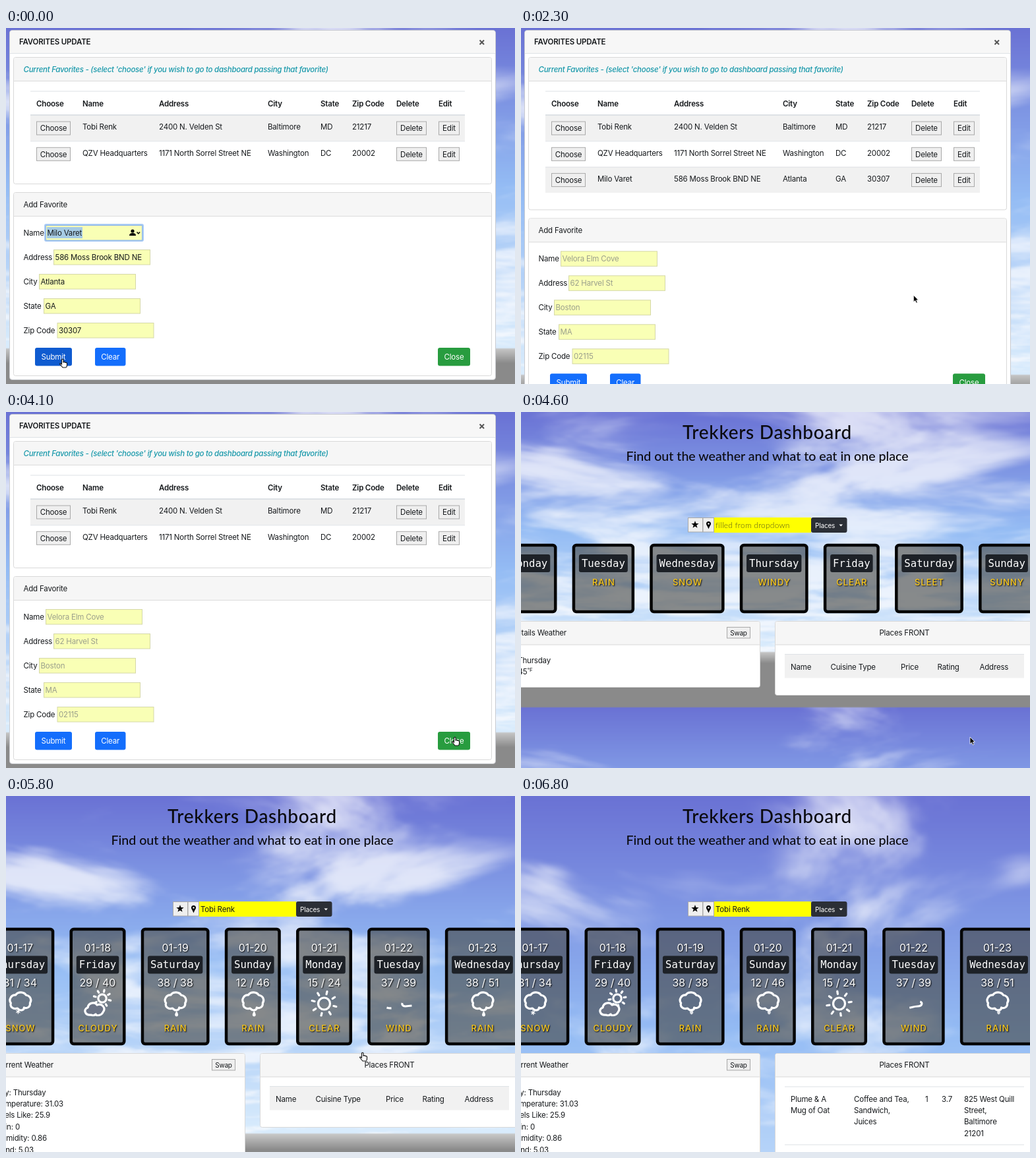
An HTML page with a canvas for the animation above (6.9 s loop, 772 by 540 pixels).

```html
<!DOCTYPE html>
<html lang="en">
<head>
<meta charset="utf-8">
<title>Trekkers Dashboard</title>
<style>
html, body { margin: 0; width: 772px; height: 540px; overflow: hidden; background: #8a8a8a; }
canvas, svg { position: absolute; left: 0; top: 0; width: 772px; height: 540px; }
text { font: 11.5px Inter, sans-serif; letter-spacing: -.18px; fill: #16191c; white-space: pre; }
.b { font-weight: 600; }
.i { font-style: italic; font-weight: 500; fill: #1798aa; letter-spacing: -.26px; }
.hint { fill: #9b9f8c; }
.btn { fill: #fff; }
.h1 { font: 500 28px Lato, sans-serif; letter-spacing: .7px; fill: #0b0b10; }
.h2 { font: 500 19.6px Lato, sans-serif; letter-spacing: 0; fill: #0b0b10; }
.thin { font: 300 12px Lato, sans-serif; letter-spacing: .2px; fill: #55551a; }
.small { font-size: 10px; }
.day { font: 15.65px "DejaVu Sans Mono", monospace; letter-spacing: 0; fill: #fff; }
.num { font-size: 16px; letter-spacing: 0; fill: #fff; text-shadow: 1px 1px 2px #000; }
.cond { font-size: 13px; font-weight: 500; letter-spacing: 1px; fill: #fbc91c; text-shadow: 1px 1px 2px #000; }
.ico { fill: none; stroke: #fff; stroke-width: 3.2; stroke-linecap: round; stroke-linejoin: round; }
</style>
</head>
<body>
<canvas id="sky" width="386" height="270"></canvas>
<svg id="ui" viewBox="0 0 772 540"></svg>
<script>
const LOOP = 6900, ADDED = 1000, DELETED = 3400, CLOSED = 4400, FILLED = 4800, LOADED = 5900;
const ui = document.getElementById('ui');
const ctx = document.getElementById('sky').getContext('2d');

/* ---------- sky ---------- */
const clamp = v => Math.max(0, Math.min(1, v));
const smooth = v => v * v * (3 - 2 * v);
const mix = (a, b, k) => a + (b - a) * k;
const blend = (p, q, k) => p.map((v, i) => mix(v, q[i], k));

function hash(x, y) {
  let h = Math.imul(x, 374761393) + Math.imul(y, 668265263) | 0;
  h = Math.imul(h ^ h >>> 13, 1274126177);
  return ((h ^ h >>> 16) >>> 0) / 4294967296;
}
function noise(x, y) {
  const i = Math.floor(x), j = Math.floor(y), u = smooth(x - i), v = smooth(y - j);
  return mix(mix(hash(i, j), hash(i + 1, j), u), mix(hash(i, j + 1), hash(i + 1, j + 1), u), v);
}
function fbm(x, y) {
  let sum = 0, amp = .5;
  for (let o = 0; o < 5; o++, amp /= 2, x = x * 2 + 7, y = y * 2 + 3) sum += amp * noise(x, y);
  return sum;
}

const ZENITH = [106, 114, 212], MIDDLE = [148, 188, 244], HORIZON = [216, 235, 252], WHITE = [250, 251, 254];

// h: height of the backdrop; blobs: x, y, rx, ry, added cover
const modalBlobs = [[757, 115, 60, 40, .15], [757, 380, 60, 70, .2], [757, 20, 60, 30, -.12]];
const skies = {
  two: { h: 597, base: 0, blobs: modalBlobs },
  three: { h: 646, base: 0, blobs: modalBlobs },
  empty: { h: 447, base: .04, blobs: [[90, 20, 150, 40, .14], [680, 40, 130, 50, .18], [80, 130, 150, 30, .16],
    [620, 120, 200, 30, .16], [380, 50, 130, 45, -.1], [390, 260, 450, 80, .17], [290, 480, 70, 25, .12]] },
  filled: { h: 630, base: -.04, blobs: [[110, 125, 150, 32, .22], [620, 110, 180, 45, .18],
    [280, 30, 140, 40, .08], [120, 20, 140, 30, .05], [380, 310, 450, 90, .16]] },
  loaded: { h: 900, base: -.12, blobs: [[250, 140, 130, 45, .28], [20, 110, 60, 40, .2], [565, 45, 60, 50, .18],
    [440, 50, 70, 50, .14], [765, 110, 45, 40, .22], [340, 35, 80, 30, .1], [380, 390, 450, 60, .15]] }
};

function skyColor(x, y, { h, base, blobs }) {
  const v = y % h / h;
  if (v > .812) {
    const g = mix(200, 138, clamp((v - .812) * 26));
    return [g, g, g];
  }
  const z = 1 / (1.05 - v), px = (x - 386) / 220 * z + 40, py = 6 * z;
  let cover = fbm(px + 1.2 * noise(px * .8, py * .8 + 9), py) + base - (y > h ? .2 : 0);
  for (const [bx, by, rx, ry, a] of blobs)
    cover += a * Math.exp(-(((x - bx) / rx) ** 2) - ((y - by) / ry) ** 2);
  const k = v / .8 * 2;
  const air = k < 1 ? blend(ZENITH, MIDDLE, k) : blend(MIDDLE, HORIZON, clamp(k - 1));
  return blend(air, WHITE, smooth(clamp((cover - .38) / .42)) * .78);
}

const skyCache = {};
function paintSky(name) {
  if (!skyCache[name]) {
    const img = ctx.createImageData(386, 270);
    for (let n = 0; n < 386 * 270; n++)
      img.data.set([...skyColor(n % 386 * 2, Math.floor(n / 386) * 2, skies[name]), 255], n * 4);
    skyCache[name] = img;
  }
  ctx.putImageData(skyCache[name], 0, 0);
}

/* ---------- drawing helpers ---------- */
const text = (x, y, s, cls = '', anchor = 'start') =>
  `<text x="${x}" y="${y}" class="${cls}" text-anchor="${anchor}">${s}</text>`;
const mid = (x, y, s, cls) => text(x, y, s, cls, 'middle');
const rect = (x, y, w, h, fill, stroke = 'none', r = 0, sw = 1) =>
  `<rect x="${x}" y="${y}" width="${w}" height="${h}" fill="${fill}" stroke="${stroke}" rx="${r}" stroke-width="${sw}"/>`;
const path = (d, attrs = '') => `<path d="${d}" ${attrs}/>`;
const rule = (x, y, w, color = '#dee2e6', h = 1) => rect(x, y, w, h, color);
const group = (x, y, s) => `<g transform="translate(${x} ${y})">${s}</g>`;
const plainBtn = (x, y, w, h, s, cls = '') =>
  rect(x + .5, y + .5, w - 1, h - 1, '#efefef', '#a9a9a9') + mid(x + w / 2, y + h / 2 + 4.2, s, cls);
const solidBtn = (x, y, w, s, color) => rect(x, y, w, 27.5, color, 'none', 3) + mid(x + w / 2, y + 18, s, 'btn');
const card = (x, y, w, h, head) =>
  rect(x + .5, y + .5, w, h, '#fff', '#d9d9d9', 3) + rect(x + 1, y + 1, w - 1, head, '#f6f6f6', 'none', 3) +
  rule(x + 1, y + head, w - 1, '#dcdcdc');

/* ---------- modal ---------- */
const columns = [46, 116, 232, 397, 477, 525, 592, 656];
const heads = ['Choose', 'Name', 'Address', 'City', 'State', 'Zip Code', 'Delete', 'Edit'];
const saved = [
  ['Tobi Renk', '2400 N. Velden St', 'Baltimore', 'MD', '21217'],
  ['QZV Headquarters', '1171 North Sorrel Street NE', 'Washington', 'DC', '20002'],
  ['Milo Varet', '586 Moss Brook BND NE', 'Atlanta', 'GA', '30307']
];
const hints = ['Velora Elm Cove', '62 Harvel St', 'Boston', 'MA', '02115'];
const labels = ['Name', 'Address', 'City', 'State', 'Zip Code'];
const fieldX = [60, 72, 50, 57, 77.5];

function tableRow(cells, i, mouse) {
  const y = 132 + i * 39.3;
  const hover = mouse.x > 37 && mouse.x < 696 && mouse.y >= y && mouse.y < y + 39.3;
  return rect(37, y, 659, 39.3, hover ? '#e5e5e5' : i % 2 ? '#fff' : '#f1f1f1') + rule(37, y, 659) +
    cells.map((s, c) => text(columns[c + 1], y + 22.3, s)).join('') +
    plainBtn(46, y + 9.5, 52, 21, 'Choose') + plainBtn(592, y + 9.5, 46, 21, 'Delete') +
    plainBtn(656, y + 9.5, 32, 21, 'Edit');
}

function form(typed) {
  let s = '';
  labels.forEach((label, i) => {
    const y = 299 + i * 37, x = fieldX[i], focus = typed && !i;
    s += text(26.5, y + 16, label);
    if (focus) s += rect(x - 1, y - 1, 149, 25, 'none', '#a9cbf5', 2, 2);
    s += rect(x + .5, y + .5, 146, 22.5, '#f9ffb5', focus ? '#8fb6e6' : '#d5d8a8');
    if (focus) s += rect(62, y + 3, 54, 17, '#a6cbe4');
    s += text(x + 2.5, y + 16, typed ? saved[2][i] : hints[i], typed ? '' : 'hint');
  });
  if (typed) s += '<circle cx="192" cy="308" r="2.6"/>' + path('M187 315q0-4 5-4t5 4z') +
    path('M198.5 309.5l2.3 2.5 2.3-2.5', 'fill="none" stroke="#000" stroke-width="1.5"');
  return s;
}

function modal(t, mouse) {
  const rows = t >= ADDED && t < DELETED ? 3 : 2, dy = rows === 3 ? 39.3 : 0, typed = t < ADDED;
  return rect(5.5, 3.5, 737, 530 + dy, '#fff', '#c9cbd0', 4) + rect(6, 4, 736, 34, '#f7f7f7', 'none', 4) +
    rule(6, 38, 736) + text(20, 25, 'FAVORITES UPDATE', 'b') +
    path('M718.5 18.5l6.5 6.5m0-6.5l-6.5 6.5', 'stroke="#555" stroke-width="2"') +
    card(11, 44, 725, 192 + dy, 36) +
    text(26.5, 67, "Current Favorites - (select 'choose' if you wish to go to dashboard passing that favorite)", 'i') +
    rule(37, 95.5, 659) + heads.map((h, i) => text(columns[i], 118.5, h, 'b')).join('') +
    saved.slice(0, rows).map((r, i) => tableRow(r, i, mouse)).join('') + rule(37, 131, 659, '#dee2e6', 1.5) +
    group(0, dy, card(11, 249, 725, 278, 36) + text(26.5, 271.5, 'Add Favorite') + form(typed) +
      solidBtn(44, 485, 56, 'Submit', typed ? '#0f5bd0' : '#146efc') + solidBtn(135, 485, 46.5, 'Clear', '#146efc') +
      solidBtn(655, 485, 49, 'Close', t > 4100 ? '#22883a' : '#289c3f'));
}

/* ---------- weather icons, centred on 0,0 ---------- */
const CLOUD = 'M-4 8C-10 10-16 6-14 0C-18-5-13-13-7-12C-3-18 6-17 9-12C16-11 18-4 15 0C16 6 10 9 6 7C6 11 0 13-4 8Z';
function sun(r, turn) {
  let s = `<circle r="${r}"/>`;
  for (let i = 0; i < 8; i++) {
    const a = i * Math.PI / 4 + turn, c = Math.cos(a), n = Math.sin(a);
    s += path(`M${c * r * 1.65} ${n * r * 1.65}L${c * r * 2.1} ${n * r * 2.1}`);
  }
  return s;
}
function icon(kind, t) {
  const e = t - 5200, turn = e * .0004;
  const fall = (start, speed) => (start + speed * e + 200) % 20;
  let s;
  if (kind === 'RAIN') {
    const k = fall(15, .0565);
    s = path(CLOUD) + path(`M2 ${k + 3}q5 7 0 9q-5-2 0-9z`, `fill="#fff" stroke="none" opacity="${clamp((k - 3) / 3)}"`);
  } else if (kind === 'SNOW') {
    const k = fall(12, .0617);
    let flake = '';
    for (let i = 0; i < 3; i++) flake += `<path d="M-3 0H3" transform="rotate(${i * 60 + e * .05})"/>`;
    s = path(CLOUD) +
      `<g transform="translate(-3 ${k + 4})" stroke-width="1.3" opacity="${clamp((k - 3) / 3)}">${flake}</g>`;
  } else if (kind === 'CLOUDY') {
    s = group(7, -7, sun(6.2, turn)) +
      path('M-10 18C-20 19-22 9-15 7C-14-1-4-2-1 3C7 0 13 8 8 14C6 19-2 20-3 17C-5 19-8 19-10 18Z', 'fill="#6c7486"');
  } else if (kind === 'CLEAR') {
    s = group(0, 1, sun(9, turn));
  } else {
    const start = (80 + .15 * e + 100) % 100;
    s = path('M-18 7C-9 10-2 5 6 5C14 5 14-2 9-2C4-2 4 5 10 5L20 4',
      `pathLength="100" stroke-linecap="butt" stroke-dasharray="42 58" stroke-dashoffset="${-start}"`);
  }
  return `<g class="ico" clip-path="url(#box)">${s}</g>`;
}

/* ---------- dashboard ---------- */
const week = [['Monday', ''], ['Tuesday', 'RAIN'], ['Wednesday', 'SNOW'], ['Thursday', 'WINDY'],
  ['Friday', 'CLEAR'], ['Saturday', 'SLEET'], ['Sunday', 'SUNNY']];
const forecast = [['Thursday', 'SNOW', '31 / 34'], ['Friday', 'CLOUDY', '29 / 40'], ['Saturday', 'RAIN', '38 / 38'],
  ['Sunday', 'RAIN', '12 / 46'], ['Monday', 'CLEAR', '15 / 24'], ['Tuesday', 'WIND', '37 / 39'],
  ['Wednesday', 'RAIN', '38 / 51']];

function dayCards(t, full) {
  let x = -30.3;
  return (full ? forecast : week).map(([day, cond, temps], i) => {
    const badge = day.length * 9.42 + 8, w = badge + 20, c = x + w / 2, dy = full ? 26.5 : 0;
    let s = rect(x + 2, 202, w - 4, full ? 174 : 101, 'rgba(62,62,58,.58)', '#050505', 4, 4.5) +
      rect(c - badge / 2, 216 + dy, badge, 27, '#1d2127', 'none', 3) + mid(c, 234.5 + dy, day, 'day') +
      mid(c + .5, full ? 356.5 : 263, cond, 'cond');
    if (full) s += mid(c, 235.5, '01-' + (17 + i), 'num') + mid(c, 289, temps, 'num') + group(c, 314, icon(cond, t));
    x += w + 23.7;
    return s;
  }).join('');
}

function searchBar(full) {
  let star = '';
  for (let i = 0; i < 10; i++) {
    const r = i % 2 ? 2.4 : 6, a = i * Math.PI / 5;
    star += (i ? 'L' : 'M') + (264 + r * Math.sin(a)) + ' ' + (171 - r * Math.cos(a));
  }
  return rect(253.5, 160.5, 22, 21.5, '#efefef', '#a9a9a9') + path(star + 'z') +
    rect(276, 160.5, 16.5, 21.5, '#efefef', '#a9a9a9') +
    path('M284.5 177.5C283 173 281 171.5 281 169.5a3.5 3.5 0 0 1 7 0C288 171.5 286 173 284.5 177.5z') +
    '<circle cx="284.5" cy="169.5" r="1.3" fill="#efefef"/>' +
    rect(293, 160, 147, 23, '#ff0') + text(295, 175.5, full ? saved[0][0] : 'filled from dropdown', full ? '' : 'thin') +
    rect(440, 160, 54.5, 23, '#2b2f36', 'none', 3) + text(446, 175.5, 'Places', 'btn small') +
    path('M482.5 170.5h5.5l-2.75 3z', 'fill="#fff"');
}

function panels(t, full) {
  const dy = full ? 73 : 0, loaded = t >= LOADED;
  let s = card(-60, 317, 422, full ? 300 : 100, 35.5) + card(385, 317, 400, loaded ? 300 : 112, 35.5) +
    text(full ? 72 : 69, 339, full ? 'Current Weather' : 'Details Weather', '', 'end') +
    plainBtn(312, 326, 36, 17.5, 'Swap', 'small') + mid(581.5, 339, 'Places FRONT');
  if (full) {
    [['Day: Thursday', 60.5], ['Temperature: 31.03', 87], ['Feels Like: 25.9', 67], ['Rain: 0', 21],
      ['Humidity: 0.86', 62], ['Wind: 5.03', 42]].forEach(([line, x], i) => s += text(x, 380.5 + i * 17.4, line, '', 'end'));
  } else {
    s += text(45, 381, 'Thursday', '', 'end') + text(9.5, 398, '45', '', 'end') +
      '<text x="9.5" y="394" style="font-size:8px">°F</text>';
  }
  if (loaded) {
    s += rule(400, 367.5, 363) + rule(400, 455.5, 363);
    [[409, 'Plume &amp; A', 'Mug of Oat'], [505, 'Coffee and Tea,', 'Sandwich,', 'Juices'], [613, '1'], [638, '3.7'],
      [672, '825 West Quill', 'Street,', 'Baltimore', '21201']].forEach(([x, ...lines]) =>
      lines.forEach((line, i) => s += text(x, 390.5 + i * 17.4, line)));
  } else {
    s += rect(400, 367, 363, 36.5, '#f1f1f1') + rule(400, 367, 363);
    [['Name', 409], ['Cuisine Type', 469.5], ['Price', 576], ['Rating', 631.5], ['Address', 695.5]]
      .forEach(([h, x]) => s += text(x, 390.5, h));
  }
  return group(0, dy, s);
}

function dashboard(t) {
  const full = t >= FILLED;
  return '<clipPath id="box"><path d="M-24-22H24V20.5H-24z"/></clipPath>' +
    mid(373.5, 41, 'Trekkers Dashboard', 'h1') +
    mid(373.5, 74, 'Find out the weather and what to eat in one place', 'h2') +
    searchBar(full) + dayCards(t, full) + panels(t, full);
}

/* ---------- pointer ---------- */
const track = [[0, 86, 502], [1000, 86, 502], [1400, 583, 484], [2000, 583, 484], [2800, 622, 235],
  [3400, 622, 235], [4100, 681, 493], [4600, 681, 493], [4800, 480, 215], [5100, 541, 389], [LOOP, 541, 389]];
function pointerAt(t) {
  const i = Math.max(1, track.findIndex(k => k[0] > t)), [a, x, y] = track[i - 1], [b, u, v] = track[i];
  const k = smooth((t - a) / (b - a));
  return { x: mix(x, u, k), y: mix(y, v, k) };
}
function pointer(t, { x, y }) {
  if (t >= LOADED) return '';
  const hand = t <= ADDED || t >= 4100 && t < CLOSED || t >= FILLED;
  return group(x, y, hand
    ? path('M-1.5 1Q0-.5 1 1V5Q3 4 4 5.5Q6 5 6.5 6.5V9.5Q6.5 12.5 4.5 13H0Q-2.5 10-4.5 7.5Q-4 6-1.5 8Z',
      'fill="#fff" stroke="#111" stroke-width="1.1"')
    : path('M0 0V10.5L2.5 8.3 4.2 12 6 11.2 4.4 7.6H7.5Z', 'stroke="#fff" stroke-width=".8"'));
}

/* ---------- loop ---------- */
let shown = -1;
function frame(now) {
  const t = Math.floor(now % LOOP / 100) * 100;
  if (t !== shown) {
    shown = t;
    const mouse = pointerAt(t);
    paintSky(t >= LOADED ? 'loaded' : t >= FILLED ? 'filled' : t >= CLOSED ? 'empty' :
      t >= ADDED && t < DELETED ? 'three' : 'two');
    ui.innerHTML = (t < CLOSED ? modal(t, mouse) : dashboard(t)) + pointer(t, mouse);
  }
  requestAnimationFrame(frame);
}
frame(0);
</script>
</body>
</html>
```
